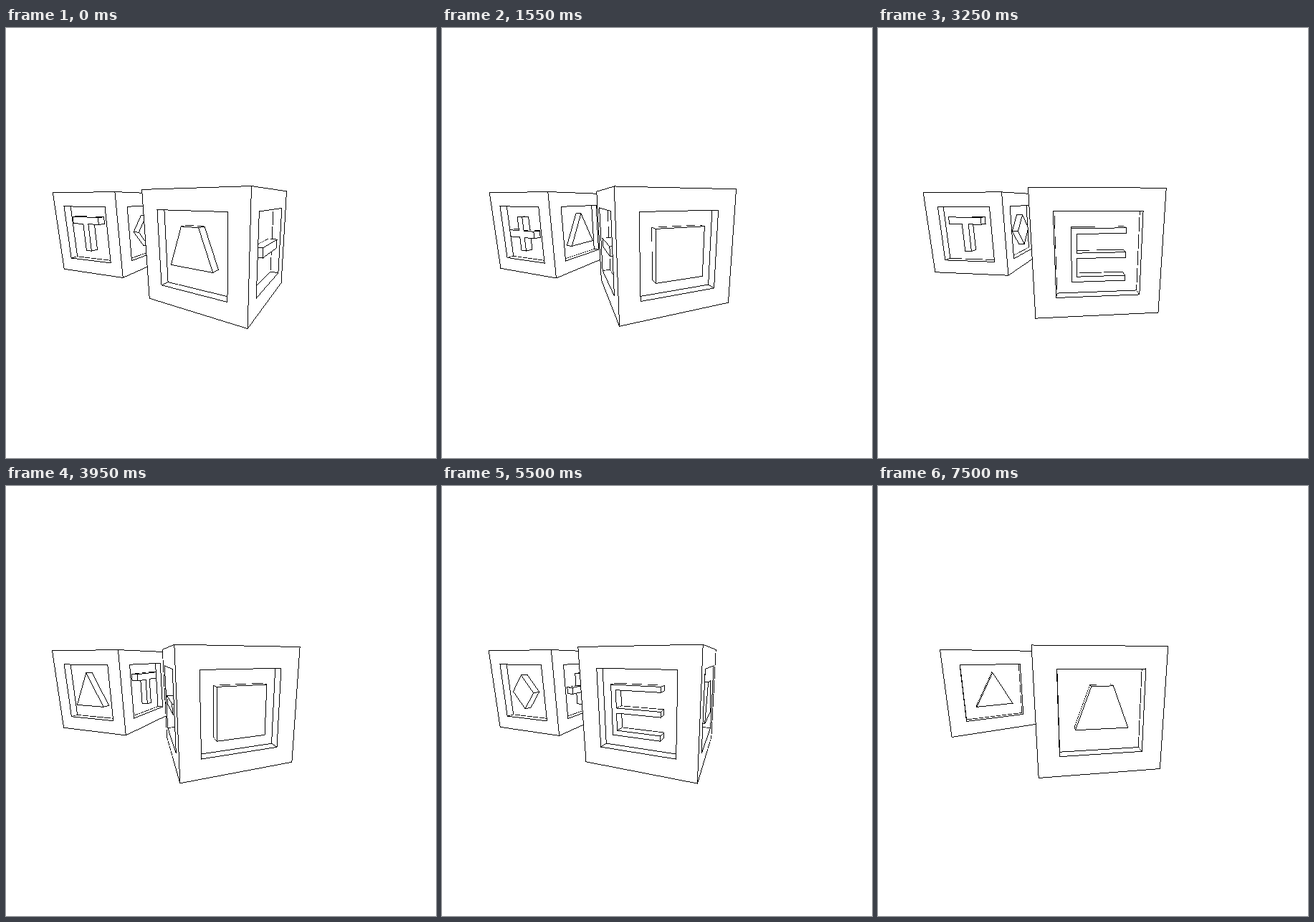
These frames come from a looping animation (600 px wide and 600 px high, 7550 ms). An HTML page with a canvas:

```html
<!DOCTYPE html>
<html lang="en">
<head>
<meta charset="utf-8">
<title>Turning blocks</title>
<style>
  html, body { margin: 0; width: 100%; height: 100%; overflow: hidden; background: #fff; }
  canvas { display: block; width: 100%; height: 100%; image-rendering: pixelated; }
</style>
</head>
<body>
<canvas id="stage" width="600" height="600"></canvas>
<script>
const SIZE = 600, STEP = 50, FRAMES = 151;
const ctx = document.getElementById('stage').getContext('2d');
const image = ctx.createImageData(SIZE, SIZE);
const pixels = new Uint32Array(image.data.buffer);
const nearness = new Float32Array(SIZE * SIZE);   // 1 / distance per pixel
const WHITE = 0xffffffff, BLACK = 0xff000000;

// Outlines run counter-clockwise in units of one sixth of half a block side.
const U = 1 / 6, S = 2.5, B = 0.5, RIM = 4, FLOOR = 5 * U;
const rect = (w, h) => [[-w, -h], [w, -h], [w, h], [-w, h]];
const shapes = {
  trapezoid: [[-S, -1.5], [S, -1.5], [1, S], [-1, S]],
  minus: rect(S, B),
  square: rect(S, S),
  e: [[-S, -S], [S, -S], [S, -2], [-2, -2], [-2, -0.25], [S, -0.25],
      [S, 0.25], [-2, 0.25], [-2, 2], [S, 2], [S, S], [-S, S]],
  t: [[-B, -S], [B, -S], [B, 1.5], [S, 1.5], [S, S], [-S, S], [-S, 1.5], [-B, 1.5]],
  diamond: [[0, -S], [2, 0], [0, S], [-2, 0]],
  plus: [[-B, -S], [B, -S], [B, -B], [S, -B], [S, B], [B, B],
         [B, S], [-B, S], [-B, B], [-S, B], [-S, -B], [-B, -B]],
  triangle: [[-S, -2.04], [S, -2.04], [0, 2.82]]
};
const blocks = [
  { x: 0, z: 0, start: -0.508, speed: 0.13, faces: ['trapezoid', 'minus', 'square', 'e'] },
  { x: -2.97, z: -1.98, start: -0.337, speed: 0.1, faces: ['t', 'diamond', 'plus', 'triangle'] }
];

// The camera stands above and in front of the origin and looks at it.
const camera = { distance: Math.hypot(5, 25) / 6, sin: 1 / Math.sqrt(26), cos: 5 / Math.sqrt(26) };

function project(x, y, z) {
  const w = 1 / (camera.distance - y * camera.sin - z * camera.cos);
  return {
    x: 300 + 298.2 * x * w,
    y: 299.3 - 300 * (y * camera.cos - z * camera.sin) * w,
    w
  };
}

function facesCamera(points) {
  let area = 0;
  points.forEach((p, i) => {
    const q = points[(i + 1) % points.length];
    area += p.x * q.y - q.x * p.y;
  });
  return area < 0;
}

// Even-odd scanline fill; 1 / distance is linear across the screen.
function fill(...contours) {
  const [a, b, c] = contours[0];
  const det = (b.x - a.x) * (c.y - a.y) - (c.x - a.x) * (b.y - a.y);
  const wx = ((b.w - a.w) * (c.y - a.y) - (c.w - a.w) * (b.y - a.y)) / det;
  const wy = ((b.x - a.x) * (c.w - a.w) - (c.x - a.x) * (b.w - a.w)) / det;
  const ys = contours.flat().map(p => p.y);
  const last = Math.min(SIZE - 1, Math.ceil(Math.max(...ys)));
  for (let row = Math.max(0, Math.floor(Math.min(...ys))); row <= last; row++) {
    const y = row + 0.5, cuts = [];
    for (const points of contours) {
      points.forEach((p, i) => {
        const q = points[(i + 1) % points.length];
        if ((p.y <= y) !== (q.y <= y)) cuts.push(p.x + (y - p.y) / (q.y - p.y) * (q.x - p.x));
      });
    }
    cuts.sort((m, n) => m - n);
    for (let k = 0; k + 1 < cuts.length; k += 2) {
      const end = Math.ceil(cuts[k + 1] - 0.5);
      for (let col = Math.ceil(cuts[k] - 0.5); col < end; col++) {
        const w = a.w + wx * (col + 0.5 - a.x) + wy * (y - a.y);
        const at = row * SIZE + col;
        if (w > nearness[at]) nearness[at] = w;
      }
    }
  }
}

function line(p, q, bias) {
  const dx = q.x - p.x, dy = q.y - p.y;
  const flat = Math.abs(dx) > Math.abs(dy);
  const from = flat ? p.x : p.y, span = flat ? dx : dy;
  const first = Math.floor(Math.min(from, from + span));
  const last = Math.floor(Math.max(from, from + span));
  for (let i = first; i <= last; i++) {
    const t = span ? Math.min(1, Math.max(0, (i + 0.5 - from) / span)) : 0;
    const col = flat ? i : Math.floor(p.x + t * dx);
    const row = flat ? Math.floor(p.y + t * dy) : i;
    const at = row * SIZE + col;
    if ((p.w + t * (q.w - p.w)) * (1 + bias) >= nearness[at]) pixels[at] = BLACK;
  }
}

// Fills go into the depth buffer at once; outlines wait until it is complete.
let outlines = [];
const outline = (points, bias) => outlines.push({ points, bias });

function drawWalls(front, back) {
  front.forEach((p, i) => {
    const j = (i + 1) % front.length;
    const wall = [p, back[i], back[j], front[j]];
    if (!facesCamera(wall)) return;
    fill(wall);
    outline(wall, 0.004);
  });
}

function drawFace(block, angle, shape) {
  const sin = Math.sin(angle), cos = Math.cos(angle);
  const place = (points, depth) => points.map(([u, v]) => project(
    block.x + depth * sin + u * U * cos,
    v * U,
    block.z + depth * cos - u * U * sin
  ));
  const outer = place(rect(6, 6), 1);
  if (!facesCamera(outer)) return;

  const hole = rect(RIM, RIM).reverse();
  const rim = place(hole, 1), floor = place(hole, FLOOR);
  const top = place(shape, 1);
  fill(outer, rim);
  fill(floor);
  fill(top);
  [outer, rim, top].forEach(points => outline(points, 0.015));
  drawWalls(rim, floor);
  drawWalls(top, place(shape, FLOOR));
}

function draw(frame) {
  pixels.fill(WHITE);
  nearness.fill(0);
  outlines = [];
  for (const block of blocks) {
    block.faces.forEach((name, i) =>
      drawFace(block, block.start + block.speed * frame + i * Math.PI / 2, shapes[name]));
  }
  for (const { points, bias } of outlines) {
    points.forEach((p, i) => line(p, points[(i + 1) % points.length], bias));
  }
  ctx.putImageData(image, 0, 0);
}

let shown = -1;
function tick() {
  const frame = Math.floor(performance.now() / STEP) % FRAMES;
  if (frame !== shown) draw(shown = frame);
  requestAnimationFrame(tick);
}
tick();
</script>
</body>
</html>
```
